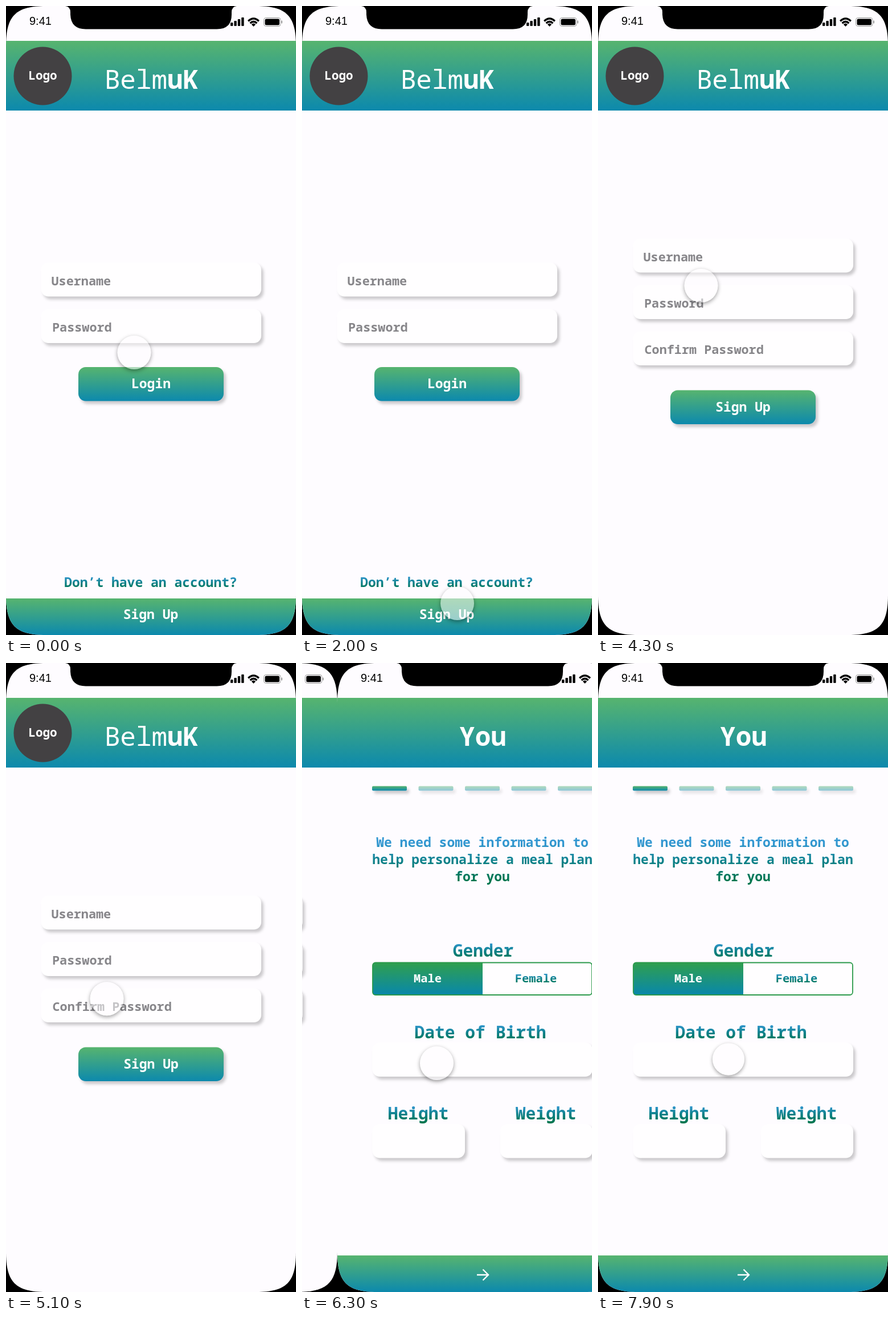
An HTML page for the animation above (8000 ms loop, 509 by 1101 pixels).

```html
<!DOCTYPE html>
<html lang="en">
<head>
<meta charset="utf-8">
<title>Sign-up flow</title>
<style>
  html, body { margin: 0; width: 100%; height: 100%; overflow: hidden; background: #000; }
  svg { display: block; position: absolute; left: 0; top: 0; }
  text { font-family: "Noto Sans Mono", "DejaVu Sans Mono", monospace; font-weight: 600; }
  .clock { font: 400 20px "Liberation Sans", Arial, sans-serif; }
  .raised { filter: drop-shadow(4px 5.5px 2.5px rgba(0, 0, 0, .2)); }
  #touch {
    position: absolute; left: -29.5px; top: -29.5px; width: 59px; height: 59px;
    border-radius: 50%; background: rgba(255, 254, 255, .52);
    box-shadow: 0 2.5px 7px rgba(0, 0, 0, .38);
  }
</style>
</head>
<body>
<svg width="509" height="1101" viewBox="0 0 509 1101">
  <defs>
    <linearGradient id="bar" x2="0" y2="1">
      <stop stop-color="#57b46f"/><stop offset="1" stop-color="#0c89ad"/>
    </linearGradient>
    <linearGradient id="choice" x2="0" y2="1">
      <stop stop-color="#309f4e"/><stop offset="1" stop-color="#0887ab"/>
    </linearGradient>
    <linearGradient id="ink" x2="0" y1=".2" y2=".9">
      <stop stop-color="#3498d2"/><stop offset=".5" stop-color="#0d8189"/><stop offset="1" stop-color="#00764f"/>
    </linearGradient>
    <clipPath id="screen">
      <path d="M0 70C0 17 17 0 70 0H439C492 0 509 17 509 70V1031C509 1084 492 1101 439 1101H70C17 1101 0 1084 0 1031Z"/>
    </clipPath>
  </defs>
  <g id="track"></g>
</svg>
<div id="touch"></div>
<script>
const WIDTH = 509, LOOP = 8000, PUSH_TIME = 300;
const PUSHES = [2723, 6106];

const rect = (x, y, w, h, r, fill, extra = '') =>
  `<rect x="${x}" y="${y}" width="${w}" height="${h}" rx="${r}" fill="${fill}" ${extra}/>`;
const label = (str, x, y, size, fill, extra = 'text-anchor="middle"') =>
  `<text x="${x}" y="${y}" font-size="${size}" fill="${fill}" ${extra}>${str}</text>`;
const inked = (str, x, y, size) => label(str, x, y, size, 'url(#ink)');
const field = (y, hint = '', hintX = 0, x = 61.5, w = 386.5) =>
  rect(x, y, w, 59.5, 13, '#fffeff', 'class="raised"') +
  label(hint, hintX, y + 39.5, 21.8, '#87868a', '');
const button = (str, y) =>
  rect(127, y, 255, 59.5, 13, 'url(#bar)', 'class="raised"') + label(str, 254.5, y + 37, 23, '#fff');
const footer = rect(0, 1037, WIDTH, 64, 0, 'url(#bar)');

const statusBar = `
  <path d="M104 0Q113 1 113 11V15Q114 40.5 140 40.5H370Q396 40.5 396 15V11Q396 1 405 0Z"/>
  <text class="clock" x="41" y="33">9:41</text>
  ${[0, 1, 2, 3].map(i => rect(394 + i * 6.4, 29 - i * 3, 4.4, 6 + i * 3, 1, '#000')).join('')}
  <g fill="none" stroke="#000" stroke-width="3.4">
    <path d="M425.2 26.5Q434.5 17.5 443.8 26.5M428.6 30.2Q434.5 24.6 440.4 30.2"/>
  </g>
  <path d="M430.8 32.2Q434.5 29 438.2 32.2L434.5 36Z"/>
  ${rect(452.5, 20.5, 29.5, 15, 4, 'none', 'stroke="#999"')}
  ${rect(454.5, 22.5, 25.5, 11, 2.5, '#000')}
  ${rect(483.3, 25.5, 1.7, 5, 1, '#999')}`;

const brand = `
  <circle cx="64.5" cy="122.5" r="51" fill="#434143"/>
  ${label('Logo', 64.5, 129, 21, '#fff')}
  ${label('<tspan font-weight="300">Belm</tspan><tspan font-weight="700">uK</tspan>', 255.5, 145, 46, '#fff')}`;

const login = brand +
  field(449, 'Username', 79.5) + field(530.5, 'Password', 81) + button('Login', 632) +
  inked('Don’t have an account?', 254, 1017, 23) +
  footer + label('Sign Up', 254, 1073, 23, '#fff');

const signUp = brand +
  field(407, 'Username', 79.5) + field(488.5, 'Password', 81) +
  field(569.5, 'Confirm Password', 81.5) + button('Sign Up', 672.5);

const paragraph = ['We need some information to', 'help personalize a meal plan', 'for you']
  .map((line, i) => `<tspan x="254.5" y="${322 + i * 30}">${line}</tspan>`).join('');

const profile = label('You', 255.5, 145, 46, '#fff') +
  [0, 1, 2, 3, 4].map(i =>
    rect(61 + i * 81.5, 215.5, 61, 8, 2, 'url(#bar)', `class="raised" opacity="${i ? .46 : 1}"`)).join('') +
  inked(paragraph, 254.5, 322, 23) +
  inked('Gender', 256, 514, 29.6) +
  rect(62, 524.5, 385, 56.5, 5, '#fffeff') +
  '<path d="M255 524.5H67Q62 524.5 62 529.5V576Q62 581 67 581H255Z" fill="url(#choice)"/>' +
  rect(62, 524.5, 385, 56.5, 5, 'none', 'stroke="#2b9a4b" stroke-width="1.8"') +
  label('Male', 158.5, 559, 20.4, '#fff') + inked('Female', 348.5, 559, 20.4) +
  inked('Date of Birth', 251, 657, 29.6) + field(664.5) +
  inked('Height', 142, 799, 29.6) + field(807, '', 0, 61.5, 162.5) +
  inked('Weight', 366, 799, 29.6) + field(807, '', 0, 286, 162) +
  footer +
  '<path d="M245 1071H265M255.5 1061.5L265 1071L255.5 1080.5" fill="none" stroke="#fff" stroke-width="2.4"/>';

const track = document.getElementById('track');
const touch = document.getElementById('touch');
track.innerHTML = [login, signUp, profile].map((content, i) => `
  <g transform="translate(${i * WIDTH})" clip-path="url(#screen)">
    ${rect(0, 0, WIDTH, 1101, 0, '#fefcff')}
    ${rect(0, 61, WIDTH, 122, 0, 'url(#bar)')}
    ${content}${statusBar}
  </g>`).join('');

// Touch point: time, x, y, scale
const PATH = [
  [0, 224.5, 606, 1], [1000, 246, 820, 1], [2000, 272, 1045, 1], [2450, 277, 1062, 1],
  [2600, 277, 1062, .9], [2750, 278, 1058, 1], [3000, 285, 982, 1], [3800, 196, 468, 1],
  [4300, 180.5, 489, 1], [5100, 176.5, 587, 1], [5800, 236, 700, 1], [5980, 237, 702, .9],
  [6150, 237, 702, 1], [6300, 236, 700, 1], [7700, 229, 693, 1], [7900, 228.5, 693, .95],
  [8000, 228.5, 693, .9]
];

const slope = (i, k) => {
  const a = PATH[i], b = PATH[i + 1];
  return a && b ? (b[k] - a[k]) / (b[0] - a[0]) : 0;
};
// Harmonic mean keeps the curve from overshooting its points
const tangent = (i, k) => {
  const before = slope(i - 1, k), after = slope(i, k);
  return before * after > 0 ? 2 * before * after / (before + after) : 0;
};
function along(time, k) {
  const i = PATH.findIndex((p, n) => n === PATH.length - 2 || time < PATH[n + 1][0]);
  const a = PATH[i], b = PATH[i + 1], span = b[0] - a[0], u = (time - a[0]) / span;
  const s = u * u * (3 - 2 * u);
  return a[k] + (b[k] - a[k]) * s +
    span * u * (1 - u) * ((1 - u) * tangent(i, k) - u * tangent(i + 1, k));
}

const easeOut = u => 1 - (1 - u) ** 2;
const pushed = (time, start) => easeOut(Math.min(1, Math.max(0, (time - start) / PUSH_TIME)));

function draw() {
  const time = performance.now() % LOOP;
  // Whole pixels leave no seam between neighbouring screens
  const shift = Math.round(PUSHES.reduce((sum, start) => sum + pushed(time, start), 0) * WIDTH);
  track.setAttribute('transform', `translate(${-shift})`);
  touch.style.transform =
    `translate(${along(time, 1)}px, ${along(time, 2)}px) scale(${along(time, 3)})`;
  requestAnimationFrame(draw);
}
draw();
</script>
</body>
</html>
```
